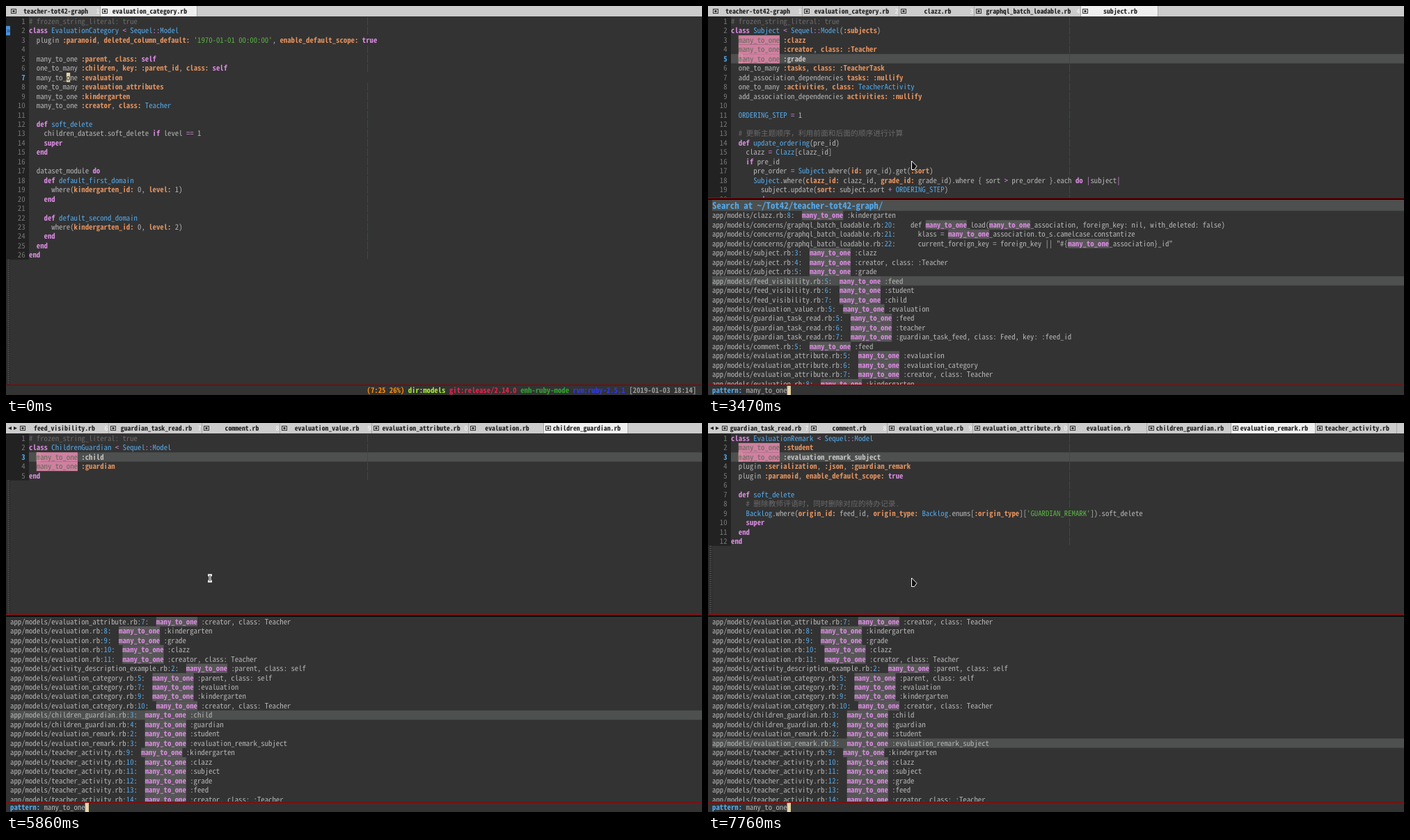
Write an HTML page with a canvas that moves like this. It is 1000 by 560 pixels and loops after 8000 ms.

```html
<!DOCTYPE html>
<html lang="en">
<head>
<meta charset="utf-8">
<title>Code search preview</title>
<style>
html, body { margin: 0; width: 100%; height: 100%; overflow: hidden; background: #333; }
canvas { display: block; }
</style>
</head>
<body>
<canvas id="stage" width="1000" height="560"></canvas>
<script>
const ctx = document.getElementById('stage').getContext('2d');
ctx.textRendering = 'geometricPrecision';

const LOOP = 8000, CELL = 5.38, TAB_CELL = 4.88, ROW = 13.46;
const TEXT_X = 33, TOP = 15.3, LIST_X = 6;
const FAMILY = '"Noto Sans Mono CJK SC", "Noto Sans Mono CJK JP", "Noto Sans Mono", monospace';
const WORD = 'many_to_one';
const COLOR = {
  bg: '#333333', gutter: '#222222', text: '#b4b4b4', line: '#4d504e', blue: '#55a9ea',
  keyword: '#d98be0', symbol: '#e2925f', string: '#5cb544', comment: '#6b6b6b',
  pink: '#d080a0', onPink: '#626a5a', cursor: '#e6d3a8', red: '#a00000'
};

// One em that makes a character exactly one cell wide.
ctx.font = `100px ${FAMILY}`;
const EM = 100 / ctx.measureText('0').width;

const FILES = {
  evaluation_category: `# frozen_string_literal: true
class EvaluationCategory < Sequel::Model
  plugin :paranoid, deleted_column_default: '1970-01-01 00:00:00', enable_default_scope: true

  many_to_one :parent, class: self
  one_to_many :children, key: :parent_id, class: self
  many_to_one :evaluation
  one_to_many :evaluation_attributes
  many_to_one :kindergarten
  many_to_one :creator, class: Teacher

  def soft_delete
    children_dataset.soft_delete if level == 1
    super
  end

  dataset_module do
    def default_first_domain
      where(kindergarten_id: 0, level: 1)
    end

    def default_second_domain
      where(kindergarten_id: 0, level: 2)
    end
  end
end`,
  clazz: `# frozen_string_literal: true
class Clazz < Sequel::Model(:clazzes)
  plugin :paranoid, enable_default_scope: true

  one_to_many :students
  one_to_many :subjects
  one_to_many :feeds
  many_to_one :kindergarten
  many_to_many :teachers

  def soft_delete
    students_dataset.soft_delete
    super
  end
end`,
  graphql_batch_loadable: `# frozen_string_literal: true
module GraphqlBatchLoadable
  def self.included(base)
    base.extend(ClassMethods)
  end

  module ClassMethods
    def batch_load(id)
      RecordLoader.for(self).load(id)
    end

    def one_to_many_load(association, key: nil)
      klass = association.to_s.classify.constantize
      define_method(association) do
        ManyLoader.for(klass, key).load(id)
      end
    end


    def many_to_one_load(many_to_one_association, foreign_key: nil, with_deleted: false)
      klass = many_to_one_association.to_s.camelcase.constantize
      current_foreign_key = foreign_key || "#{many_to_one_association}_id"
      define_method(association) do
        RecordLoader.for(klass, with_deleted).load(id)
      end
    end
  end
end`,
  subject: `# frozen_string_literal: true
class Subject < Sequel::Model(:subjects)
  many_to_one :clazz
  many_to_one :creator, class: :Teacher
  many_to_one :grade
  one_to_many :tasks, class: :TeacherTask
  add_association_dependencies tasks: :nullify
  one_to_many :activities, class: TeacherActivity
  add_association_dependencies activities: :nullify

  ORDERING_STEP = 1

  # 更新主题顺序，利用前面和后面的顺序进行计算
  def update_ordering(pre_id)
    clazz = Clazz[clazz_id]
    if pre_id
      pre_order = Subject.where(id: pre_id).get(:sort)
      Subject.where(clazz_id: clazz_id, grade_id: grade_id).where { sort > pre_order }.each do |subject|
        subject.update(sort: subject.sort + ORDERING_STEP)
      end
    end
  end
end`,
  feed_visibility: `# frozen_string_literal: true
class FeedVisibility < Sequel::Model(:feed_visibilities)
  plugin :paranoid, enable_default_scope: true

  many_to_one :feed
  many_to_one :student
  many_to_one :child
end`,
  guardian_task_read: `# frozen_string_literal: true
class GuardianTaskRead < Sequel::Model(:guardian_task_reads)
  plugin :paranoid, :enable_default_scope => true

  many_to_one :feed
  many_to_one :teacher
  many_to_one :guardian_task_feed, class: Feed, key: :feed_id
end`,
  comment: `# frozen_string_literal: true
class Comment < Sequel::Model(:comments)
  plugin :paranoid, enable_default_scope: true

  many_to_one :feed
end`,
  evaluation_value: `# frozen_string_literal: true
class EvaluationValue < Sequel::Model(:evaluation_values)
  plugin :paranoid, enable_default_scope: true

  many_to_one :evaluation
end`,
  evaluation_attribute: `# frozen_string_literal: true
class EvaluationAttribute < Sequel::Model(:evaluation_attributes)
  plugin :paranoid, enable_default_scope: true

  many_to_one :evaluation
  many_to_one :evaluation_category
  many_to_one :creator, class: Teacher

  def evaluated?
    !finished_at.nil?
  end

end`,
  evaluation: `# frozen_string_literal: true
class Evaluation < Sequel::Model(:evaluations)
  plugin :paranoid, enable_default_scope: true

  one_to_many :evaluation_values
  one_to_many :evaluation_attributes

  many_to_one :kindergarten
  many_to_one :grade
  many_to_one :clazz
  many_to_one :creator, class: Teacher
end`,
  children_guardian: `# frozen_string_literal: true
class ChildrenGuardian < Sequel::Model
  many_to_one :child
  many_to_one :guardian
end`,
  evaluation_remark: `class EvaluationRemark < Sequel::Model
  many_to_one :student
  many_to_one :evaluation_remark_subject
  plugin :serialization, :json, :guardian_remark
  plugin :paranoid, enable_default_scope: true

  def soft_delete
    # 删除教师评语时，同时删除对应的待办记录.
    Backlog.where(origin_id: feed_id, origin_type: Backlog.enums[:origin_type]['GUARDIAN_REMARK']).soft_delete
    super
  end
end`,
  teacher_activity: `# frozen_string_literal: true

class TeacherActivity < Sequel::Model(:activities)
  plugin :paranoid, :enable_default_scope=>true

  # 在Activity创建好之后创建Feed用于给家长端
  include TeacherPushNotification

  many_to_one :kindergarten
  many_to_one :clazz
  many_to_one :subject
  many_to_one :grade
  many_to_one :feed
  many_to_one :creator, class: :Teacher

  delegate :video, to: :feed, allow_nil: true

  def create_feed(visible_type, student_ids)
    metadata = {'title' => title, 'content' => content}
    feed = Feed.create(metadata)
  end
end`
};
for (const name in FILES) FILES[name] = FILES[name].split('\n');

// Search hits, in list order: file and matching line numbers.
const HITS = `clazz 8;graphql_batch_loadable 20 21 22;subject 3 4 5;feed_visibility 5 6 7;
evaluation_value 5;guardian_task_read 5 6 7;comment 5;evaluation_attribute 5 6 7;
evaluation 8 9 10 11;activity_description_example 2;evaluation_category 5 7 9 10;
children_guardian 3 4;evaluation_remark 2 3;teacher_activity 9 10 11 12 13 14`
  .split(';').flatMap(group => {
    const [file, ...lines] = group.trim().split(' ');
    const dir = file.startsWith('graphql') ? 'concerns/' : '';
    return lines.map(n => ({
      file, line: +n, path: `app/models/${dir}${file}.rb:`,
      text: FILES[file] ? FILES[file][n - 1] : '  many_to_one :parent, class: self'
    }));
  });

// Tab widths: unscrolled, scrolled, crowded, tight.
const TAB_WIDTH = {
  'teacher-tot42-graph': [131], evaluation_category: [139, 137], clazz: [108],
  graphql_batch_loadable: [153, 147], subject: [111, 112], feed_visibility: [130],
  guardian_task_read: [134, 134, 128], comment: [112, 112, 112, 107],
  evaluation_value: [126, 132, 123, 118], evaluation_attribute: [139, 139, 137, 139],
  evaluation: [108, 108, 113, 97], children_guardian: [121, 121, 121, 119],
  evaluation_remark: [121, 121, 121, 118], teacher_activity: [117, 117, 117, 113]
};

// Typing phase: time, cursor column, column in the status line.
const TYPING = [[0, 10, 25], [80, 7, 25], [130, 7, 7], [540, 2, 7], [590, 2, 2],
  [1180, 6, 2], [1280, 9, 2], [1430, 13, 2], [1530, 13, 13]];

// Browsing phase: time, selected hit, previewed hit, flags.
const ARROW = 1, LOADING = 2;
const BROWSING = [[2030, 0, -1], [2600, 0, 0], [2650, 1, 0], [2710, 1, 1], [2770, 2, 2],
  [3060, 3, 2], [3130, 4, 3], [3200, 5, 4], [3260, 6, 5], [3330, 7, 6],
  [3470, 7, 6, ARROW], [3530, 8, 7], [3610, 11, 8], [3690, 12, 11], [3780, 14, 12],
  [4030, 14, 14], [4100, 13, 14], [4370, 12, 13], [4440, 11, 12], [4510, 11, 11],
  [4590, 10, 11], [4680, 10, 10], [4840, 11, 10], [4910, 11, 11], [4980, 12, 12],
  [5050, 13, 13], [5110, 14, 13], [5180, 14, 14], [5250, 15, 15, ARROW | LOADING], [5340, 18, 15],
  [5570, 25, 18], [5630, 25, 25], [5800, 27, 25], [5860, 27, 27], [5920, 28, 28],
  [6090, 29, 28], [6170, 30, 29], [6250, 30, 30], [6440, 31, 30], [6520, 31, 31, LOADING],
  [6600, 31, 31], [6700, 32, 32], [6790, 33, 32], [6880, 33, 33], [7040, 32, 33],
  [7140, 32, 32], [7240, 31, 31], [7350, 30, 31], [7450, 30, 30], [7560, 29, 29],
  [7710, 30, 29], [7760, 30, 30, ARROW]];

const latest = (steps, t) => steps.findLast(s => (s.time ?? s[0]) <= t);

function tabLayout(names, start, active) {
  const mode = !start ? 0 : names[active] === 'teacher_activity' ? 3 : start > 6 - 1 ? 2 : 1;
  let x = start ? 18 : 5;
  return names.slice(start).map((name, i) => {
    const widths = TAB_WIDTH[name], w = widths[mode] ?? widths.at(-1);
    const tab = { name, x, w, index: start + i, active: start + i === active };
    x += w;
    return tab;
  });
}

// Replay the browsing steps once to know scrolling and tabs at each of them.
const names = ['teacher-tot42-graph', 'evaluation_category'];
const firstTabs = tabLayout(names, 0, 1);
let tabStart = 0, active = 1, scroll = 0;
const states = BROWSING.map(([time, selected, preview, flags = 0]) => {
  if (selected > scroll + (scroll ? 18 : 17)) scroll = selected - 10;
  if (preview >= 0 && !(flags & LOADING)) {
    const { file } = HITS[preview];
    if (!names.includes(file)) names.push(file);
    active = names.indexOf(file);
    tabStart = Math.min(tabStart, active);
  }
  let tabs;
  const fits = () => {
    tabs = tabLayout(names, tabStart, active);
    const tab = tabs[active - tabStart];
    return tab.x + tab.w <= 1000;
  };
  while (!fits()) tabStart++;
  return { time, selected, preview, flags, scroll, tabs };
});

function rect(x, y, w, h, color) {
  ctx.fillStyle = color;
  ctx.fillRect(x, y, w, h);
}

function put(text, x, y, color, bold = false, cell = CELL) {
  ctx.font = `${bold ? 'bold ' : ''}${cell * EM}px ${FAMILY}`;
  ctx.fillStyle = color;
  ctx.fillText(text, x, y);
}

function clipped(y, h, paint) {
  ctx.save();
  ctx.beginPath();
  ctx.rect(0, y, 1000, h);
  ctx.clip();
  paint();
  ctx.restore();
}

const SYNTAX = new RegExp([
  `(?<hit>${WORD})`, '(?<comment>#\\s.*)', `(?<string>'[^']*'|"[^"]*")`, '(?<op>::|[=<>|+]+)',
  '(?<symbol>:\\w+|\\b[a-z]\\w*:(?!:))', '(?<name>(?<=def )[\\w.?]+)',
  '(?<keyword>\\b(?:class|module|def|if|do|end|super|self|true|false|nil|include)\\b)',
  '(?<call>\\bdelegate\\b)', '(?<type>\\b[A-Z]\\w*)'
].join('|'), 'g');
const STYLE = {
  comment: [COLOR.comment], string: [COLOR.string], op: [COLOR.keyword],
  symbol: [COLOR.symbol, true], name: [COLOR.blue], keyword: [COLOR.keyword, true],
  call: [COLOR.blue, true], type: [COLOR.blue]
};

function drawCode(line, y, { pink, plain, current }) {
  let col = 0;
  const draw = (text, color = COLOR.text, bold) => {
    if (text.trim()) put(text, TEXT_X + col * CELL, y + 10.6, color, bold);
    col += text.length;
  };
  for (const m of line.matchAll(SYNTAX)) {
    draw(line.slice(col, m.index));
    const kind = Object.keys(m.groups).find(k => m.groups[k]);
    if (kind === 'hit') {
      if (pink) rect(TEXT_X + col * CELL, y, m[0].length * CELL, ROW, COLOR.pink);
      draw(m[0], pink ? COLOR.onPink : COLOR.text);
    } else {
      const [color, bold] = plain ? [] : STYLE[kind];
      draw(m[0], current ? '#c2c2c2' : color, bold);
    }
  }
  draw(line.slice(col));
}

function hollowCursor(col, y, color = COLOR.cursor) {
  ctx.strokeStyle = color;
  ctx.lineWidth = 1;
  ctx.strokeRect(TEXT_X + col * CELL + .3, y + .5, CELL - .6, ROW - 1);
}

function drawEditor(file, current, bottom, opts) {
  const lines = FILES[file], first = current > 19 ? current - 9 : 1;
  clipped(15, bottom - 15, () => {
    const end = TOP + (lines.length - first + 1) * ROW;
    rect(0, 15, TEXT_X, end - 15, COLOR.gutter);
    rect(0, end, 6, bottom - end, '#2b2b2b');
    for (let y = end; y < bottom; y += 3) rect(2, y, 3, 1, '#555');
    for (let n = first; n <= lines.length; n++) {
      const line = lines[n - 1], y = TOP + (n - first) * ROW, isCurrent = n === current;
      if (y > bottom) break;
      if (isCurrent && opts.pink) rect(TEXT_X, y, 967, ROW, COLOR.line);
      if (line.length < 90 && !(isCurrent && !opts.pink)) rect(519, y + 1, 1, ROW - 2, '#2f5148');
      const label = String(n);
      put(label, 27.6 - label.length * CELL, y + 10.6, isCurrent ? COLOR.blue : '#777', isCurrent);
      if (opts.region && isCurrent) {
        rect(TEXT_X + 2 * CELL, y, (opts.region - 2) * CELL, ROW, '#555');
      }
      drawCode(line, y, { ...opts, current: isCurrent && opts.pink && !opts.plain });
      if (isCurrent && opts.pink) hollowCursor(2, y, 'rgba(230,211,168,.35)');
    }
    if (!opts.pink) {
      const y = TOP + ROW;
      rect(0, y, 6, ROW, '#4a92dc');
      put('»', .5, y + 10.4, '#1d4f8a', true);
    }
  });
}

function drawTabs(tabs) {
  rect(0, 0, 1000, 15, '#cccccc');
  if (tabs[0].index) {
    ctx.fillStyle = '#222';
    for (const [tip, base] of [[3, 8], [16, 11]]) {
      ctx.beginPath();
      ctx.moveTo(tip, 7.5);
      ctx.lineTo(base, 5);
      ctx.lineTo(base, 10);
      ctx.fill();
    }
  }
  for (const { name, x, w, index, active } of tabs) {
    if (active) rect(x, 0, w, 15, '#efefef');
    rect(x + w - 1, 0, 1, 15, '#a8a8a8');
    ctx.strokeStyle = '#333';
    ctx.lineWidth = 1;
    ctx.strokeRect(x + 2.5, 4.5, 7, 6);
    rect(x + 4.5, 6, 3, 3, '#333');
    const label = index ? `${name}.rb` : name;
    put(label, x + 1 + w / 2 - label.length * TAB_CELL / 2, 11.3, '#1c1c1c', true, TAB_CELL);
    if (index < 10) put(String((index + 1) % 10), x + w - 6.5, 11.3, '#f6f6f6', false, TAB_CELL);
  }
}

function drawList({ selected, scroll }) {
  clipped(279, 266, () => {
    if (!scroll) {
      rect(LIST_X, 279, 994, 15.8, COLOR.line);
      put('Search at ~/Tot42/teacher-tot42-graph/', LIST_X, 291.5, COLOR.blue, true, CELL * 1.2);
    }
    const top = scroll ? 279.2 : 294.8;
    HITS.slice(scroll, scroll + 20).forEach((hit, i) => {
      const y = top + i * ROW;
      if (scroll + i === selected) rect(LIST_X, y, 994, ROW, COLOR.line);
      let x = LIST_X;
      const draw = (text, color = COLOR.text, bold) => {
        put(text, x, y + 10.6, color, bold);
        x += text.length * CELL;
      };
      draw(hit.path);
      draw(String(hit.line), COLOR.blue);
      draw(':');
      hit.text.split(WORD).forEach((part, k) => {
        if (k) {
          rect(x, y, WORD.length * CELL, ROW, '#575757');
          draw(WORD, COLOR.keyword, true);
        }
        draw(part);
      });
    });
  });
}

function drawStatus(col) {
  const parts = [[`(7:${col} 26%)`, '#ff8c0a'], ['dir:models', '#a4ee28'],
    ['git:release/2.14.0', '#f0204a'], ['enh-ruby-mode', '#2fa52f'],
    ['rvm:ruby-2.5.1', '#2e38f0'], ['[2019-01-03 18:14]', '#9a9a9a']];
  let x = 992 - (parts.map(p => p[0]).join(' ').length) * CELL;
  for (const [text, color] of parts) {
    put(text, x, 557.3, color, true);
    x += (text.length + 1) * CELL;
  }
}

function drawPrompt() {
  put('pattern:', LIST_X, 557.3, COLOR.blue, true);
  put(WORD, LIST_X + 9 * CELL, 557.3, COLOR.text);
  rect(LIST_X + 20 * CELL, 546.6, CELL, 13.4, COLOR.cursor);
}

function drawPointer(arrow) {
  ctx.strokeStyle = '#fff';
  ctx.fillStyle = '#111';
  ctx.lineWidth = 1;
  if (arrow) {
    ctx.beginPath();
    for (const [x, y] of [[292.5, 223], [300, 230.5], [296.5, 235.5], [292.5, 235.5]]) ctx.lineTo(x, y);
    ctx.closePath();
    ctx.fill();
    ctx.stroke();
    return;
  }
  rect(290, 217.5, 6, 3, '#fff');
  rect(290, 226.5, 6, 3, '#fff');
  rect(291.5, 218, 3, 11, '#fff');
  rect(292.5, 219, 1, 9, '#222');
}

function drawTyping(t) {
  const [, col, statusCol] = latest(TYPING, t), prompt = t >= 1980;
  drawTabs(firstTabs);
  drawEditor('evaluation_category', 7, 545, { region: t >= 1180 && !prompt && col });
  const y = TOP + 6 * ROW, x = TEXT_X + col * CELL;
  if (prompt) {
    hollowCursor(col, y);
    drawPrompt();
  } else {
    rect(x, y, CELL, ROW, COLOR.cursor);
    put(FILES.evaluation_category[6][col], x, y + 10.6, '#333');
    if (t >= 910 && t < 1180) put('Mark set', .7, 557.3, COLOR.text);
    drawStatus(statusCol);
  }
}

function drawBrowsing(t) {
  const state = latest(states, t), hit = HITS[state.preview];
  drawTabs(state.tabs);
  if (hit) {
    drawEditor(hit.file, hit.line, 276, { pink: true, plain: state.flags & LOADING });
    drawPointer(state.flags & ARROW);
  } else {
    drawEditor('evaluation_category', 7, 276, {});
    hollowCursor(13, TOP + 6 * ROW);
  }
  rect(0, 275.6, 1000, 1.6, COLOR.red);
  rect(0, 277.2, 1000, 1.8, '#080808');
  drawList(state);
  drawPrompt();
}

function frame() {
  const t = performance.now() % LOOP;
  rect(0, 0, 1000, 560, COLOR.bg);
  (t < 2030 ? drawTyping : drawBrowsing)(t);
  rect(0, 545, 1000, 1.5, t < 1980 ? '#7c0808' : COLOR.red);
  requestAnimationFrame(frame);
}
frame();
</script>
</body>
</html>
```
